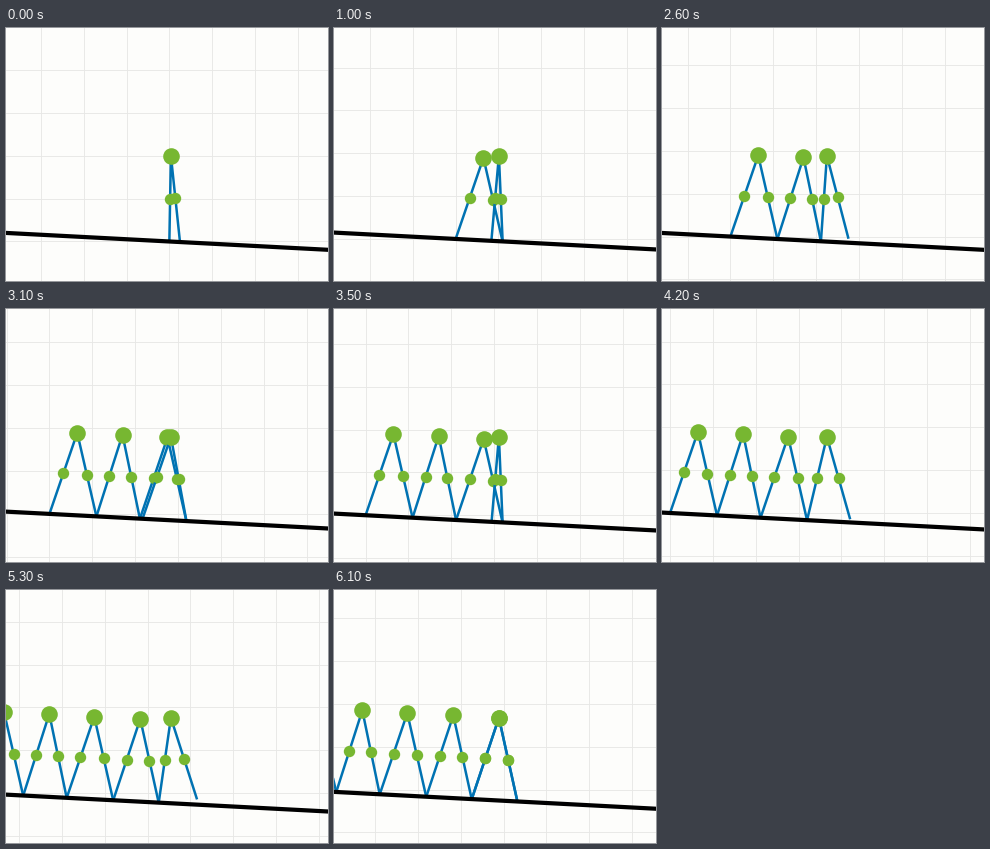
Animation of 322x253 px, one loop 6200 ms. Source, as a matplotlib script:

```python
import numpy as np
import matplotlib.pyplot as plt
from matplotlib.animation import FuncAnimation

W, H, DPI = 322, 253, 128
PX = 72 / DPI                      # points per pixel
HIP = np.array([164.9, 127.8])     # the camera keeps the hip here
LEG, CELL = 85.7, 42.85
SLOPE = np.radians(3)

STRIKES = [0, 6, 19, 30.3, 43.2, 56]        # times of the heel strikes, in ticks
STEPS = [47, 43.5, 46.5, 45.5, 45.7]        # horizontal step lengths
FEET = np.concatenate([[0], np.cumsum(STEPS)])
HALF = [np.arcsin(d / (2 * LEG)) for d in STEPS]
PASSING = [None, 0.31, 0.36, 0.365, 0.375]  # phase just before the legs pass

BLUE, GREEN = "#0072b2", "#77b731"
PAPER, GRID = "#fdfdfb", "#e7e7e5"


def hermite(u, keys):
    """Cubic through (time, value, slope) keys."""
    for (a, p, m), (b, q, n) in zip(keys, keys[1:]):
        if u <= b:
            break
    h = b - a
    x = (u - a) / h
    return (p * (1 + 2 * x) * (1 - x) ** 2 + q * x * x * (3 - 2 * x)
            + h * x * (1 - x) * (m * (1 - x) - n * x))


def angles(k, u):
    """Stance and swing lean in step k at phase u."""
    end_st, end_sw = HALF[k] + SLOPE, SLOPE - HALF[k]
    if k == 0:
        return (hermite(u, [(0, 0.018, 0.16), (1, end_st, 0.5)]),
                hermite(u, [(0, -0.105, -0.6), (1, end_sw, 0.45)]))
    prev, mid = HALF[k - 1], PASSING[k]
    stance = [(0, SLOPE - prev, 0.8), (mid, -0.043, 0.32),
              (0.62, 0.07, 0.5), (1, end_st, 1.1)]
    swing = [(0, prev + SLOPE, 0.28), (mid, 0.085, -1.4),
             (0.62, -0.255, -0.75), (1, end_sw, 0.75)]
    return hermite(u, stance), hermite(u, swing)


def ground(x):
    return -np.tan(SLOPE) * x


def walker(k, u):
    """World points: stance foot, hip, swing foot."""
    st, sw = angles(k, u)
    foot = np.array([FEET[k], ground(FEET[k])])
    hip = foot + LEG * np.array([np.sin(st), np.cos(st)])
    swing = hip - LEG * np.array([np.sin(sw), np.cos(sw)])
    return np.array([foot, hip, swing])


fig = plt.figure(figsize=(W / DPI, H / DPI), dpi=DPI, facecolor=PAPER)
ax = fig.add_axes([0, 0, 1, 1])
ax.set_xlim(0, W)
ax.set_ylim(H, 0)
ax.axis("off")

grid, = ax.plot([], [], color=GRID, lw=0.9 * PX, zorder=0)
floor, = ax.plot([], [], color="black", lw=4.2 * PX, zorder=50)


def make_figure(z):
    dot = dict(ls="", marker="o", color=GREEN, mew=0)
    legs, = ax.plot([], [], color=BLUE, lw=2.5 * PX, zorder=z,
                    solid_joinstyle="round", solid_capstyle="butt")
    masses, = ax.plot([], [], ms=11.4 * PX, zorder=z + 0.1, **dot)
    hip, = ax.plot([], [], ms=16.6 * PX, zorder=z + 0.2, **dot)
    return legs, masses, hip


def place(parts, pts):
    mids = (pts[:-1] + pts[1:]) / 2
    for part, p in zip(parts, (pts, mids, pts[1:2])):
        part.set_data(p[:, 0], p[:, 1])


marks = [make_figure(1 + k) for k in range(len(STEPS))]
live = make_figure(20)
poses = [walker(k, 1) for k in range(len(STEPS))]


def draw(tick):
    t = min(tick, STRIKES[-1])
    k = next(i for i in range(len(STEPS)) if t <= STRIKES[i + 1])
    u = (t - STRIKES[k]) / (STRIKES[k + 1] - STRIKES[k])
    pose = walker(k, u)
    hip = pose[1]

    def screen(p):
        return HIP + (p - hip) * [1, -1]

    place(live, screen(pose))
    for i, parts in enumerate(marks):
        shown = t >= STRIKES[i + 1]
        for part in parts:
            part.set_visible(shown)
        place(parts, screen(poses[i]))

    ends = np.array([-10, W + 10])
    world = ends - HIP[0] + hip[0]
    floor.set_data(ends, HIP[1] - (ground(world) - hip[1]))

    origin = screen(np.zeros(2))
    gx, gy = [], []
    for x in np.arange(origin[0] % CELL, W, CELL):
        gx += [x, x, np.nan]
        gy += [0, H, np.nan]
    for y in np.arange(origin[1] % CELL, H, CELL):
        gx += [0, W, np.nan]
        gy += [y, y, np.nan]
    grid.set_data(gx, gy)
    return []


anim = FuncAnimation(fig, draw, frames=62, interval=100, repeat=True,
                     repeat_delay=0, blit=False)
plt.show()
```
